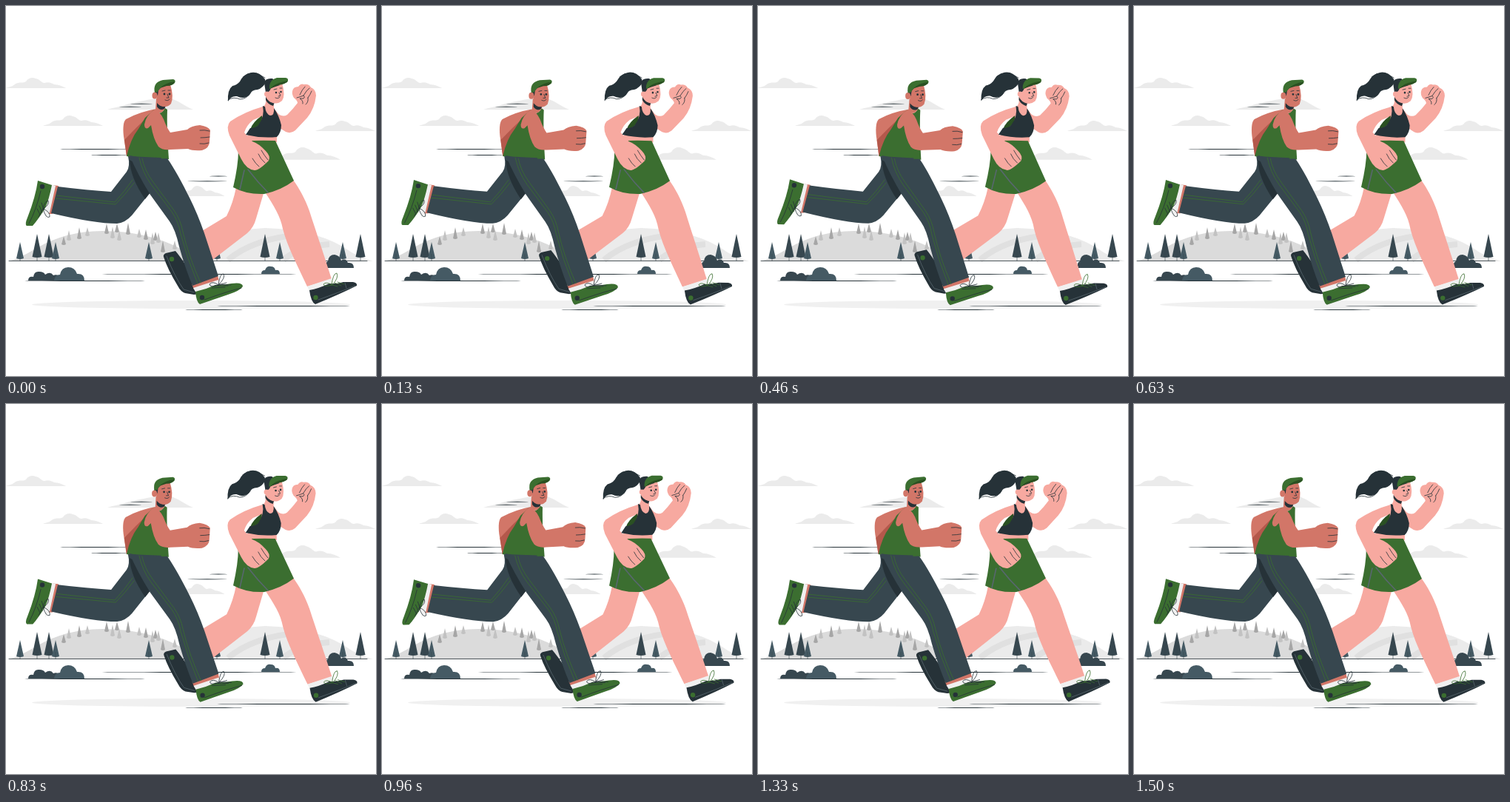
Recreate the animation shown at these times as an HTML page. Size 500 px wide and 500 px high, loop 1540 ms.

```html
<!DOCTYPE html>
<html lang="en">
<head>
<meta charset="utf-8">
<title>Two runners</title>
<style>
  html, body { margin: 0; width: 100%; height: 100%; overflow: hidden; background: #fff; }
  svg { display: block; width: 100%; height: 100%; }
  .green { fill: #3b6e30; }
  .deep { fill: #2a5022; }
  .ink { fill: #263238; }
  .slate { fill: #37474f; }
  .steel { fill: #455a64; }
  .pink { fill: #f7a9a0; }
  .tan { fill: #d27668; }
  .shade { fill: #b4584b; }
  .sock { fill: #f0f0f0; }
  .line { fill: none; stroke: #263238; stroke-width: .8; stroke-linecap: round; stroke-linejoin: round; }
  .stripe { stroke: #3b6e30; }
  .soft { stroke: #58676e; }
</style>
</head>
<body>
<svg viewBox="0 0 500 500">
  <defs>
    <path id="cloud" d="M0 14C5 12 9 12 13 8C19 5 23 8 27 5C30 0 36-1 40 1C46 2 48 7 52 7C57 5 62 7 65 9C70 9 78 12 81 14Z"/>
  </defs>

  <g fill="#ebebeb">
    <use href="#cloud" y="97"/>
    <use href="#cloud" x="50" y="148"/>
    <use href="#cloud" x="418" y="155"/>
    <use href="#cloud" transform="translate(361 191) scale(1.12 1.2)"/>
    <use href="#cloud" transform="translate(229 243) scale(.82 1)"/>
    <path d="M137 140C145 137 152 137 160 134C168 131 176 130 186 128C200 125 220 122 228 127C236 130 243 136 253 140Z"/>
  </g>

  <path fill="#ebebeb" d="M225 345Q285 302 350 300Q425 302 467 333Q480 340 496 345Z"/>
  <g fill="none" stroke="#e0e0e0" stroke-width="8">
    <path d="M300 343Q335 314 398 309"/>
    <path d="M375 343Q395 325 437 322"/>
  </g>
  <path fill="#dbdbdb" d="M4 345Q20 340 40 328Q80 304 130 304Q190 304 236 328L250 345Z"/>
  <g id="trees"></g>
  <path class="line" d="M4 344.500H488"/>

  <g class="slate">
    <path d="M30 371Q30 365 37 366Q38 358 45 359Q51 359 53 363Q60 358 64 364Q72 361 75 371Z"/>
    <path class="steel" d="M65 371Q66 363 73 363Q75 353 84 353Q93 353 96 362Q106 361 106 371Z"/>
    <path class="steel" d="M345 362Q345 357 350 357Q352 351 358 352Q363 352 364 357Q370 356 370 362Z"/>
    <path d="M433 354Q430 347 435 345Q436 336 444 336Q451 337 453 344Q459 340 462 347Q470 346 470 354Z"/>
  </g>
  <ellipse cx="250" cy="403.500" rx="215" ry="5.500" fill="#f0f0f0"/>
  <g id="streaks" class="ink"></g>

  <g id="woman">
    <path class="pink" d="M311 245Q307 266 298 284L250 313L265 354Q300 327 326 307Q335 299 338 287L349 250Z"/>
    <path class="ink" d="M213 339Q212 336 216 334L229 331Q235 338 247 356L262 384Q259 390 254 390L242 388Q236 386 232 378Q218 355 213 339Z"/>
    <path class="line soft" d="M217 338Q228 366 240 383L254 387"/>
    <circle class="green" cx="224" cy="342" r="3.200"/>

    <path class="pink" d="M349 250C362 270 371 284 374 301C380 325 396 355 407 379L440 369C431 340 418 302 410 277C404 260 396 246 388 235Z"/>
    <path class="sock" d="M407 379L440 368L442 377L411 387Z"/>
    <path class="ink" d="M410 384Q422 382 437 375Q446 376 456 373L469 373Q475 374 474 378Q450 390 418 403Q412 400 410 384Z"/>
    <path class="line soft" d="M422 397Q450 387 472 378M458 374L460 381"/>
    <circle class="green" cx="418.500" cy="394" r="3.200"/>
    <path class="line stripe" d="M440 377Q442 361 447 361Q450 367 441 377Q430 380 429 376Q432 372 441 377L448 379M444 374L453 378M448 373L457 376"/>

    <path class="pink" d="M328 173L366 174L366 184L320 184Z"/>
    <path class="green" d="M317 183Q340 181 364 182Q376 208 389 236Q372 249 349 254Q325 255 307 245Q314 215 314 195Z"/>
    <path class="line soft" style="stroke-width:1.600" d="M327 221Q340 238 354 252M322 222L316 248"/>

    <path class="pink" d="M351 118L351 130Q350 136 345 137L342 158L368 166L368 146L362 138L362 126Z"/>
    <path class="pink" d="M363 141Q372 152 380 147Q388 139 394 131Q394 128 389 124Q386 119 387 115Q388 109 395 109Q398 104 403 106Q409 105 412 110Q419 113 419 121Q417 139 407 151L391 168Q385 173 378 170L367 163Z"/>
    <path class="line" d="M397 120Q400 113 404 109M402 121Q406 114 410 111M408 124Q411 120 413 115M393 124Q397 123 402 121Q405 123 402 125L397 125Q402 128 401 132M408 124Q409 130 405 133"/>
    <path class="pink" d="M347 136Q322 143 303 156Q297 162 302 175L318 207Q325 221 336 222Q342 222 355 209Q358 203 351 196Q342 186 333 183L322 171Q325 161 334 154L348 148Z"/>
    <path class="deep" d="M346 148Q347 163 330 167Q333 157 346 148Z"/>
    <path class="ink" d="M347 135Q350 149 341 161Q337 165 330 165L324 174Q345 179 366 177Q372 171 372 161Q369 148 362 138Q363 148 357 148Q351 146 350 136Z"/>
    <path class="line" d="M341 200Q344 207 350 212M345 195Q349 202 354 208M333 206Q337 213 342 217"/>

    <path class="ink" d="M350 99Q342 88 331 90Q321 92 316 102Q312 107 306 108Q299 113 300 129Q304 121 312 122Q322 127 329 120Q332 113 340 113Q347 111 351 103Z"/>
    <path class="line" d="M320 96Q332 85 350 97M300 127Q308 122 316 126Q325 126 331 117"/>
    <path class="ink" d="M351 123Q356 132 363 130L361 135Q354 133 351 127Z"/>
    <path class="pink" d="M352 109L373 104Q378 121 373 128Q366 134 358 130Q350 124 352 109Z"/>
    <path class="ink" d="M349 104Q350 97 360 98L370 107L358 111Q356 117 351 117Z"/>
    <circle class="pink" cx="352.500" cy="119" r="3.500"/>
    <path class="green" d="M356 112Q355 100 366 97L378 97Q383 98 380 103Q373 107 367 106Z"/>
    <path class="deep" d="M361 108Q368 103 381 101Q378 106 367 107L357 112Z"/>
    <circle class="ink" cx="365" cy="117" r="1.300"/>
    <circle class="ink" cx="371.500" cy="116" r="1.300"/>
    <path class="line" d="M362 113L366 112M370 111L373 111M369 117L371 121L368 122M364 124Q368 126 370 123"/>
  </g>

  <g id="man">
    <path class="tan" d="M203 139Q180 143 162 153Q157 158 159 176L163 203L200 170Z"/>
    <path class="shade" d="M160 181Q175 165 192 149L185 170L163 203Z"/>
    <path class="green" d="M188 151L200 140Q208 150 215 138L218 140Q217 165 220 207Q190 208 163 203Q168 180 179 166Z"/>

    <path class="tan" d="M71 243L63 242L56 281L63 281Z"/>
    <path class="sock" d="M61 241L67 243L59 279L53 288Q53 262 61 241Z"/>
    <path class="green" d="M43 236L62 242Q58 262 53 273Q44 288 36 297L28 297Q25 295 29 286Q40 258 43 236Z"/>
    <path class="line" d="M47 250Q41 275 31 294M46 282L42 274M49 279L45 270M51 275L48 266"/>
    <path class="line" d="M50 274Q52 264 57 263Q59 269 50 274Q60 278 59 285Q54 288 50 274L44 285"/>
    <circle class="ink" cx="49" cy="244" r="3.200"/>

    <path class="slate" d="M165 203Q168 217 163 224L142 251Q110 249 70 244L61 280Q120 294 150 294Q161 293 170 283L194 253L210 205Z"/>
    <path class="ink" d="M167 208Q168 232 188 261L195 252L180 215Z"/>
    <path class="line stripe" d="M68 256L147 265Q160 251 171 235M67 260L148 268Q161 255 173 239"/>
    <path class="tan" d="M251 376L286 364L288 372L254 383Z"/>
    <path class="sock" d="M253 381L287 370L289 378L257 388Z"/>
    <path class="slate" d="M167 202Q190 207 218 206C228 220 239 241 248 259Q259 281 268 307L287 365L252 378Q242 354 234 325Q229 302 221 291L195 255Q178 228 167 202Z"/>
    <path class="line stripe" d="M180 205Q184 224 196 241L224 278Q233 291 236 308Q245 342 259 375M184 206Q187 222 199 238L227 276Q236 289 239 305Q247 339 263 374"/>

    <path class="green" d="M256 386Q270 383 283 377Q295 377 305 375Q320 373 320 379Q316 385 300 390L262 403Q257 400 256 386Z"/>
    <path class="line" d="M268 397Q295 387 318 381M278 381L296 380M282 378L300 378M288 376L304 377"/>
    <path class="line" d="M287 377Q289 361 294 362Q297 367 287 377Q276 381 275 376Q279 371 287 377L298 374"/>
    <circle class="ink" cx="265" cy="394" r="3.200"/>

    <path class="tan" d="M203 125L202 141Q209 149 215 138L214 125Z"/>
    <path class="tan" d="M200 140Q189 148 187 160Q187 167 192 165L196 161Q199 180 206 190Q211 195 222 194L246 193Q252 196 265 195Q275 192 275 183L276 168Q274 163 262 161Q250 162 245 167L222 171Q217 164 213 153Q208 142 200 140Z"/>
    <path class="line" d="M262 168Q268 167 275 169M263 178Q269 178 275 177M262 186Q268 187 274 185"/>

    <path class="ink" d="M204 131Q210 138 216 135L214 139Q208 142 204 136Z"/>
    <path class="tan" d="M203 110L222 106Q227 122 223 132Q217 139 208 134Q202 128 203 110Z"/>
    <path class="ink" d="M201 113L211 108L206 114L205 121L201 119Z"/>
    <ellipse class="tan" cx="201" cy="121" rx="3.500" ry="4.500"/>
    <path class="green" d="M201 117Q198 103 212 100L226 99Q230 100 228 104Q224 108 217 107Q208 109 205 116Z"/>
    <path class="deep" d="M208 111Q215 104 228 102Q226 108 217 108Z"/>
    <circle class="ink" cx="214" cy="119" r="1.400"/>
    <circle class="ink" cx="221" cy="119" r="1.400"/>
    <path class="line" d="M211 115L215 114M219 114L222 114M218 119L220 124L217 124M215 127Q219 129 221 126"/>
  </g>
</svg>
<script>
  const byId = id => document.getElementById(id);

  const tree = (x, top, base, half, fill) =>
    `<path fill="${fill}" d="M${x} ${top}L${x + half} ${base}Q${x} ${base + 2} ${x - half} ${base}Z"/>`;

  const hillTrees = [[78, 311], [85, 303], [99, 299], [110, 299], [136, 294], [144, 298], [150, 294], [153, 303],
    [165, 293], [180, 301], [189, 302], [198, 306], [202, 305], [206, 306], [212, 317], [228, 317]];
  const tallTrees = [42, 58, 350, 479];
  const shortTrees = [19, 67, 193, 285, 370, 455];

  byId('trees').innerHTML =
    hillTrees.map(([x, y], i) => tree(x, y, y + 11 + i % 3 * 2, 3, i % 2 ? '#c2c2c2' : '#a6a6a6')).join('') +
    tallTrees.map(x => tree(x, 308, 339, 6.5, '#37474f')).join('') +
    shortTrees.map(x => tree(x, 319, 341, 5, '#455a64')).join('') +
    [...tallTrees, ...shortTrees].map(x => `<path stroke="#37474f" stroke-width=".6" d="M${x} 335V345"/>`).join('');

  const streaks = [[73, 167, 193.5], [115, 163, 201.5], [168, 198, 132.3], [153, 183, 136.3], [275, 299, 230],
    [245, 299, 236.8], [25, 188, 371.5], [127, 395, 362.5], [242, 320, 410.5], [285, 465, 405.5]];
  byId('streaks').innerHTML = streaks.map(([a, b, y]) =>
    `<ellipse cx="${(a + b) / 2}" cy="${y}" rx="${(b - a) / 2}" ry=".45"/>`).join('');

  const LOOP = 1540, SWAY = 0.85;
  const start = performance.now();

  function draw() {
    const phase = (performance.now() - start) % LOOP / LOOP;
    const angle = SWAY * Math.sin(2 * Math.PI * phase);
    byId('man').setAttribute('transform', `rotate(${angle} 168 235)`);
    byId('woman').setAttribute('transform', `rotate(${angle} 345 240)`);
    requestAnimationFrame(draw);
  }
  draw();
</script>
</body>
</html>
```
